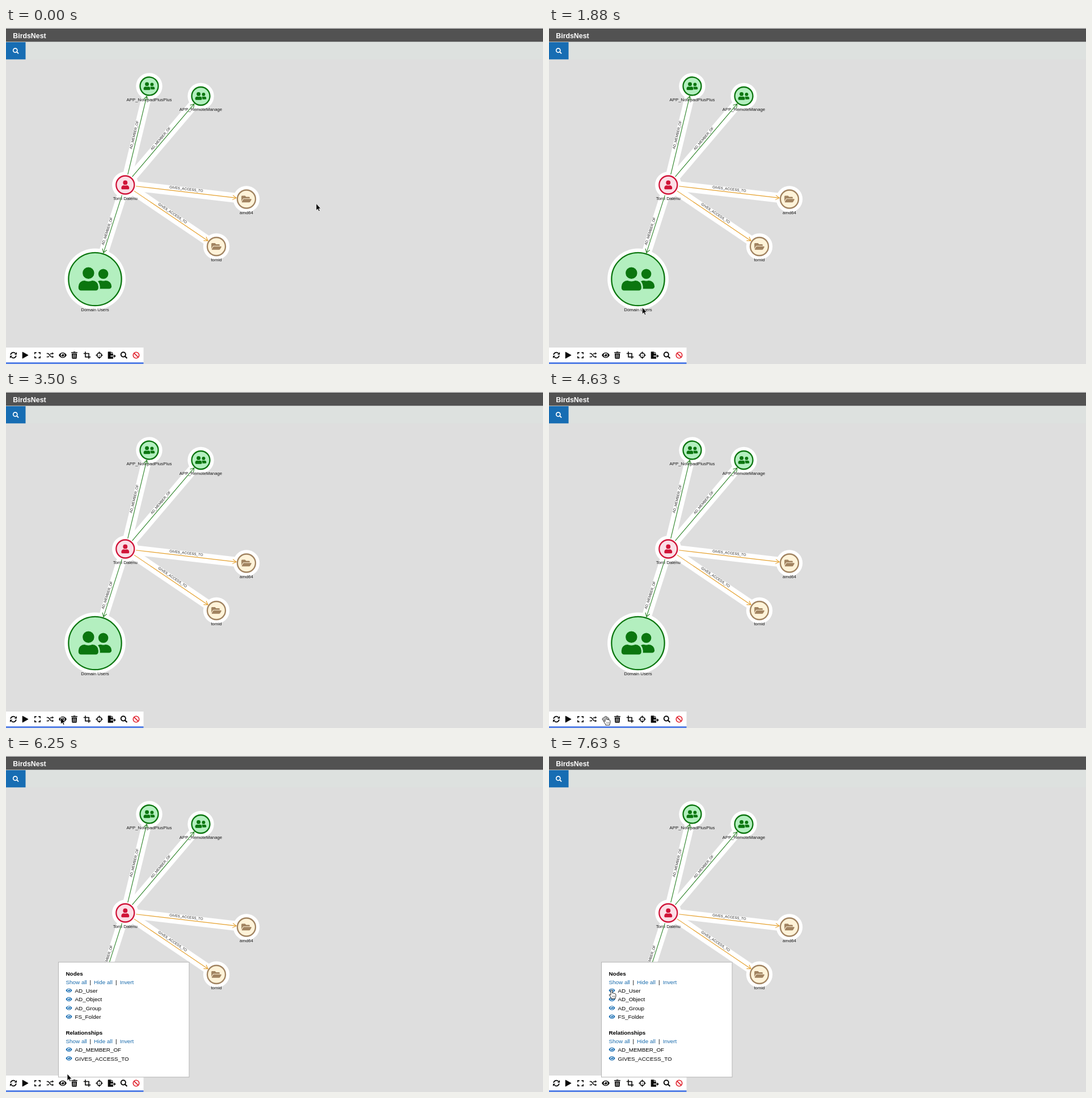
These frames come from a looping animation (947 by 592 pixels, 8 s). An HTML page:

```html
<!DOCTYPE html>
<html lang="en">
<head>
<meta charset="utf-8">
<title>Graph view</title>
<style>
html, body { margin: 0; width: 100%; height: 100%; overflow: hidden; background: #dedede; }
svg { display: block; width: 100%; height: 100%; font-family: "Liberation Sans", Arial, Helvetica, sans-serif; }
.line { fill: none; stroke: currentColor; }
.cut { fill-rule: evenodd; }
.label { font-size: 7.8px; text-anchor: middle; fill: #151515; }
.relation { font-size: 6.2px; text-anchor: middle; fill: #222; }
.panel { font-size: 9.87px; }
.link { fill: #1a6cad; }
</style>
</head>
<body>
<svg id="stage" viewBox="0 0 947 592"></svg>
<script>
const SVG = document.getElementById('stage');
const LOOP = 8000, STEP = 125;
const BLUE = '#176db3', GREEN = '#0b760f', ORANGE = '#e5a02c';

const line = (d, width) => `<path class="line" stroke-width="${width}" d="${d}"/>`;
const ring = (x, y, r, width) => `<circle class="line" stroke-width="${width}" cx="${x}" cy="${y}" r="${r}"/>`;
const dot = (x, y, r) => `<circle cx="${x}" cy="${y}" r="${r}"/>`;
const shape = d => `<path class="cut" d="${d}"/>`;
const rect = (x, y, w, h, fill) => `<rect x="${x}" y="${y}" width="${w}" height="${h}" fill="${fill}"/>`;
const text = (x, y, str, attrs = '') => `<text x="${x}" y="${y}" ${attrs}>${str}</text>`;

// Each icon: [width, markup] on a grid 512 units high
const ICONS = {
  group: [640, dot(192, 144, 112) + dot(480, 160, 96) +
    shape('M115 288q77 32 154 0a115 115 0 0 1 115 115V432a48 48 0 0 1-48 48H48a48 48 0 0 1-48-48v-29a115 115 0 0 1 115-115z') +
    shape('M432 288q48 16 96 0a112 112 0 0 1 112 112 48 48 0 0 1-48 48H415q8-90-39-145 25-15 56-15z')],
  user: [448, dot(224, 128, 128) +
    shape('M134 288q90 32 180 0a134 134 0 0 1 134 134v42a48 48 0 0 1-48 48H48a48 48 0 0 1-48-48v-42a134 134 0 0 1 134-134z')],
  folder: [576, shape('M152 224H480V176a48 48 0 0 0-48-48H272L208 64H48A48 48 0 0 0 0 112V390L69 272Q97 224 152 224z') +
    shape('M152 256H552a24 24 0 0 1 21 36L500 416Q482 448 445 448H45a24 24 0 0 1-21-36L97 288Q115 256 152 256z')],
  sync: [512, line('M55 225A205 205 0 0 1 400 115M457 287A205 205 0 0 1 112 397', 72) + shape('M504 30V210H324zM8 482V302H188z')],
  play: [448, '<path d="M30 40L415 256 30 472z" stroke="currentColor" stroke-width="50" stroke-linejoin="round"/>'],
  expand: [448, line('M32 180V64H148M300 64H416V180M416 332V448H300M148 448H32V332', 66)],
  shuffle: [512, line('M0 130H90C190 130 240 380 345 380H410M0 380H90Q130 380 165 335M265 200Q300 130 345 130H410', 66) +
    shape('M400 40L512 130 400 220zM400 290L512 380 400 470z')],
  eye: [576, shape('M0 256Q110 64 288 64T576 256Q466 448 288 448T0 256z' +
    'M144 256a144 144 0 1 0 288 0a144 144 0 1 0-288 0z' +
    'M288 160q-12 0-25 4a48 48 0 0 1-67 67 96 96 0 1 0 92-71z')],
  trash: [448, shape('M16 32H144L160 0H288L304 32H432a16 16 0 0 1 16 16V96H0V48a16 16 0 0 1 16-16z' +
    'M32 128H416L395 467a48 48 0 0 1-48 45H101a48 48 0 0 1-48-45z' +
    'M120 192h32v256h-32zM208 192h32v256h-32zM296 192h32v256h-32z')],
  crop: [512, line('M0 130H384V512M130 0V384H512', 66)],
  target: [512, ring(256, 256, 165, 64) + dot(256, 256, 36) + line('M256 0V150M256 362V512M0 256H150M362 256H512', 64)],
  export: [576, shape('M24 0H224V128a24 24 0 0 0 24 24H384V288H192v64H384V488a24 24 0 0 1-24 24H24a24 24 0 0 1-24-24V24a24 24 0 0 1 24-24z') +
    shape('M256 0L384 122H256zM384 288h64v-96l128 128-128 128v-96h-64z')],
  search: [512, ring(208, 208, 168, 80) + line('M325 325L480 480', 90)],
  ban: [512, ring(256, 256, 215, 66) + line('M105 105L407 407', 66)]
};

function icon(name, x, y, scale, color, id = '') {
  const [width, markup] = ICONS[name];
  return `<g ${id && `id="${id}"`} fill="currentColor" color="${color}"
    transform="translate(${x} ${y}) scale(${scale}) translate(${-width / 2} -256)">${markup}</g>`;
}

const KINDS = {
  group: { fill: '#b3efbf', stroke: GREEN },
  user: { fill: '#fbdfe7', stroke: '#d01438' },
  folder: { fill: '#fff3d9', stroke: '#a18360' }
};
const node = (kind, x, y, label, r = 16) => ({ kind, x, y, label, r });
const person = node('user', 210.3, 276.5, 'Tomi Dalenu');
const targets = [
  node('group', 252.5, 102.5, 'APP_NotepadPlusPlus'),
  node('group', 343.5, 120, 'APP_RemoteManage'),
  node('folder', 424, 301.5, 'amd64'),
  node('folder', 371, 385, 'tomid'),
  node('group', 157, 442.5, 'Domain Users', 46.7)
];
const nodes = [person, ...targets];

const halo = n => `<circle cx="${n.x}" cy="${n.y}" r="${n.r + 7.2}" fill="#fff"/>`;
const band = n => `<path d="M${person.x} ${person.y}L${n.x} ${n.y}" stroke="#fff" stroke-width="17"/>`;

function drawNode(n) {
  const { fill, stroke } = KINDS[n.kind];
  return `<circle cx="${n.x}" cy="${n.y}" r="${n.r}" fill="${fill}" stroke="${stroke}" stroke-width="2.3"/>` +
    icon(n.kind, n.x, n.y - n.r * .01, n.r > 20 ? .0912 : .0308, stroke) +
    text(n.x, n.y + n.r + 10, n.label, 'class="label"');
}

function drawEdge(n) {
  const dx = n.x - person.x, dy = n.y - person.y;
  const angle = Math.atan2(dy, dx) * 180 / Math.PI;
  const tip = Math.hypot(dx, dy) - n.r - 2;
  const isFolder = n.kind === 'folder';
  const upright = dx < 0 ? angle + 180 : angle;
  return `<path transform="translate(${person.x} ${person.y}) rotate(${angle})" fill="none"
      stroke="${isFolder ? ORANGE : '#2b8327'}" stroke-width="1.1" d="M19 0H${tip}m-6.5-4l6.5 4-6.5 4"/>` +
    text(0, -3.4, isFolder ? 'GIVES_ACCESS_TO' : 'AD_MEMBER_OF',
      `class="relation" transform="translate(${person.x + dx / 2} ${person.y + dy / 2}) rotate(${upright})"`);
}

function drawToolbar() {
  const tools = { sync: 13, play: 34, expand: 55.5, shuffle: 78, eye: 100, trash: 120.5,
    crop: 143, target: 164.5, export: 186.7, search: 208, ban: 229.5 };
  return rect(0, 563, 242.5, 26, '#fff') + rect(0, 589, 242.5, 3, '#5681e6') +
    Object.entries(tools).map(([name, x]) =>
      icon(name, x, 576.5, .0243, name === 'ban' ? '#e0202c' : '#0a0a0a', name === 'eye' ? 'eyeTool' : '')).join('');
}

function panelSection(top, title, rows) {
  const links = top + 14.8;
  return text(105.5, top, title, 'font-weight="bold"') +
    text(105.5, links, 'Show all', 'class="link"') + text(147.5, links, '|') +
    text(155, links, 'Hide all', 'class="link"') + text(193, links, '|') +
    text(200.7, links, 'Invert', 'class="link"') +
    rows.map((row, i) => {
      const y = links + 15.4 * (i + 1);
      return icon('eye', 111, y - 3.8, .0193, BLUE) + text(121.5, y, row);
    }).join('');
}

const CURSORS = {
  arrow: '<path d="M0 0V12.2L2.8 9.6 4.6 13.6 6.6 12.7 4.8 8.9H8.2z" fill="#000" stroke="#fff" stroke-width=".8"/>',
  hand: '<path d="M-1.3 8V1.2a1.3 1.3 0 0 1 2.6 0V5.5q2-.8 2.4.5 2-.6 2.3.7 1.6-.2 1.6 1.3v2.5q0 2-1 3.2v1.8H-.5V14q-2-2.5-3.6-5.5.6-1.6 2.8.5z" fill="#fff" stroke="#111" stroke-width=".9"/>' +
    '<path d="M1.5 10v3M3.5 10v3M5.3 10v3" stroke="#333" stroke-width=".6"/>',
  beam: '<path d="M-2.8-6Q0-6 0-4.5V4.5Q0 6-2.8 6M2.8-6Q0-6 0-4.5M2.8 6Q0 6 0 4.5M-1.5 2.2H1.5" fill="none" stroke="#111"/>'
};

SVG.innerHTML =
  rect(0, 0, 947, 592, '#dedede') + rect(0, 1, 947, 23.5, '#525252') +
  rect(0, 24.5, 947, 31, '#dde1df') + rect(0, 25, 34.5, 30.3, BLUE) +
  text(12.3, 17.7, 'BirdsNest', 'font-size="12.35" font-weight="bold" fill="#fff"') +
  icon('search', 17.3, 40.4, .0212, '#fff') +
  targets.map(band).join('') + nodes.map(halo).join('') +
  nodes.map(drawNode).join('') + targets.map(drawEdge).join('') + drawToolbar() +
  '<g id="panel" class="panel"><rect x="92.5" y="363.2" width="230.5" height="202.6" fill="#fff" stroke="#b5b5b5"/>' +
  panelSection(386.7, 'Nodes', ['AD_User', 'AD_Object', 'AD_Group', 'FS_Folder']) +
  panelSection(490.9, 'Relationships', ['AD_MEMBER_OF', 'GIVES_ACCESS_TO']) + '</g>' +
  '<g id="cursor">' + Object.entries(CURSORS).map(([name, d]) => `<g id="${name}">${d}</g>`).join('') + '</g>';

const byId = id => document.getElementById(id);
const cursor = byId('cursor'), panel = byId('panel'), eyeTool = byId('eyeTool');
const pointers = Object.keys(CURSORS).map(byId);

// Pointer track: time, x, y, pointer
const TRACK = [
  [0, 547, 309.3, 'arrow'], [1250, 547, 309.3, 'arrow'], [1875, 164.3, 492, 'arrow'], [2000, 143.8, 497, 'arrow'],
  [2250, 143.8, 497, 'arrow'], [2875, 76.8, 567, 'arrow'], [3000, 76.8, 567, 'arrow'], [3500, 96.5, 573, 'arrow'],
  [4375, 96.5, 573, 'arrow'], [4500, 98.5, 572, 'hand'], [4625, 100.3, 571.5, 'hand'], [6125, 100.3, 571.5, 'hand'],
  [6250, 108, 560, 'arrow'], [6500, 142, 485, 'arrow'], [6750, 133, 418, 'beam'], [6875, 125, 410, 'beam'],
  [7000, 122.5, 417.5, 'beam'], [7125, 130, 445, 'beam'], [7250, 133, 491, 'arrow'], [7375, 126, 470, 'arrow'],
  [7500, 114, 430, 'arrow'], [7625, 110.3, 412.3, 'hand'], [LOOP, 110.3, 412.3, 'hand']
];

function draw(now) {
  const t = Math.floor(now % LOOP / STEP) * STEP;
  const next = TRACK.findIndex(key => key[0] > t);
  const [t0, x0, y0, pointer] = TRACK[next - 1], [t1, x1, y1] = TRACK[next];
  const p = (t - t0) / (t1 - t0), ease = p * p * (3 - 2 * p);
  cursor.setAttribute('transform', `translate(${x0 + (x1 - x0) * ease} ${y0 + (y1 - y0) * ease})`);
  for (const el of pointers) el.style.display = el.id === pointer ? '' : 'none';
  panel.style.display = t >= 5000 ? '' : 'none';
  eyeTool.style.opacity = t < 4500 || t >= 6250 ? 1 : t < 4625 ? .75 : .5;
}

const start = performance.now();
function tick() {
  draw(performance.now() - start);
  requestAnimationFrame(tick);
}
tick();
</script>
</body>
</html>
```
